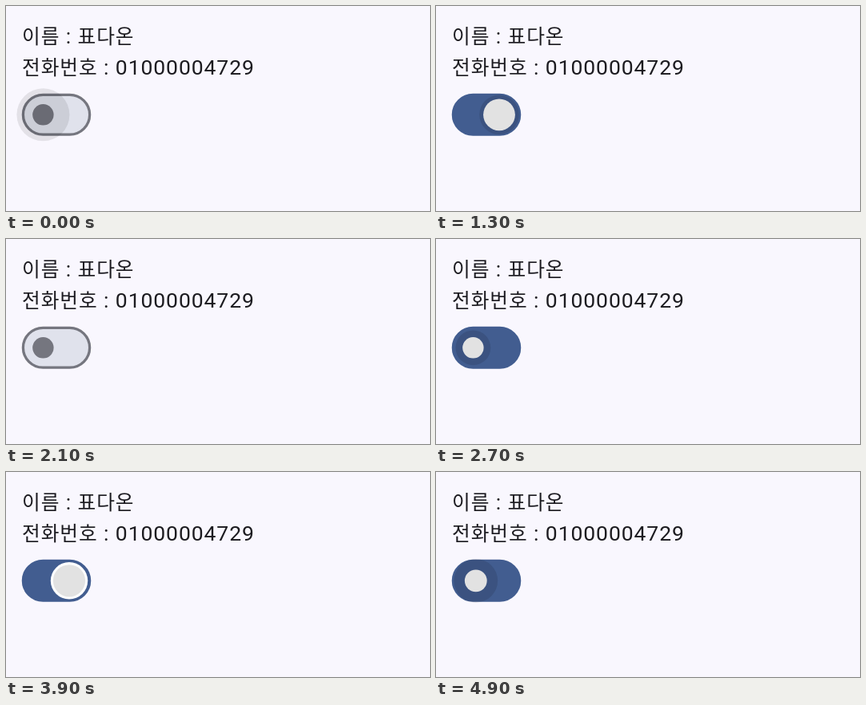
Write an HTML page that moves like this. It is 530 px wide and 257 px high and loops after 5 s.

```html
<!DOCTYPE html>
<html lang="ko">
<head>
<meta charset="utf-8">
<style>
  html, body { margin: 0; width: 100%; height: 100%; overflow: hidden; background: #f9f7fe; }
  svg { display: block; width: 530px; height: 257px; }
  text { font: 26.5px Roboto, sans-serif; letter-spacing: .92px; fill: #1c1b20; white-space: pre; }
  .ko { font: 24.7px "Noto Sans CJK KR", "Noto Sans CJK", sans-serif; }
</style>
</head>
<body>
<svg viewBox="0 0 530 257">
  <text x="20" y="46.6"><tspan class="ko">이름</tspan> : <tspan class="ko">표다온</tspan></text>
  <text x="20" y="86.4"><tspan class="ko">전화번호</tspan> : 01000004729</text>
  <rect id="track" x="21.4" y="111.4" width="83.2" height="49.8" rx="24.9" stroke-width="3.3"/>
  <circle id="thumb" cy="136.3"/>
  <circle id="ripple" cy="136.3" fill="#000"/>
</svg>
<script>
  const LOOP = 5000, FRAME = 100;
  const LEFT = 46.4, RIGHT = 79;
  const SMALL = 13.2, LARGE = 19.9, PRESSED = 23.2;
  const ON = { track: '#425d90', edge: '#425d90', thumb: '#fff' };
  const OFF = { track: '#e0e2ec', edge: '#75767f', thumb: '#75767f' };

  // Each tap switches to `on`; `delay` is the wait before the thumb slides
  const taps = [
    { at: -400, on: false, hold: Infinity, peak: .09 },
    { at: 1205, on: true, delay: -10 },
    { at: 1650, on: false },
    { at: 2633, on: true },
    { at: 3850, on: false },
    { at: 4780, on: true }
  ];

  const clamp = v => Math.min(1, Math.max(0, v));
  const mix = (a, b, k) => a + (b - a) * k;
  const smooth = k => k * k * (3 - 2 * k);

  const [track, thumb, ripple] = ['track', 'thumb', 'ripple'].map(id => document.getElementById(id));
  const set = (el, attrs) => {
    for (const key in attrs) el.setAttribute(key, attrs[key]);
  };

  function draw(now) {
    const t = Math.floor(now % LOOP / FRAME) * FRAME;
    const { at, on, delay = 100, hold = 200, peak = .115 } = taps.findLast(tap => tap.at <= t);
    const age = t - at;
    const slide = smooth(clamp((age - delay) / 100));
    const colors = on === age >= 60 ? ON : OFF;
    const cx = on ? mix(LEFT, RIGHT, slide) : mix(RIGHT, LEFT, slide);
    const r = on ? mix(SMALL, LARGE, slide) : mix(PRESSED, SMALL, slide);
    const fade = age < hold ? 1 : clamp(1 - (age - hold) / 150);

    set(track, { fill: colors.track, stroke: colors.edge });
    set(thumb, { cx, r, fill: colors.thumb });
    set(ripple, { cx, r: mix(15, 33, clamp(age / 175)), 'fill-opacity': peak * fade });
  }

  const start = performance.now();
  function tick() {
    draw(performance.now() - start);
    requestAnimationFrame(tick);
  }
  tick();
</script>
</body>
</html>
```
